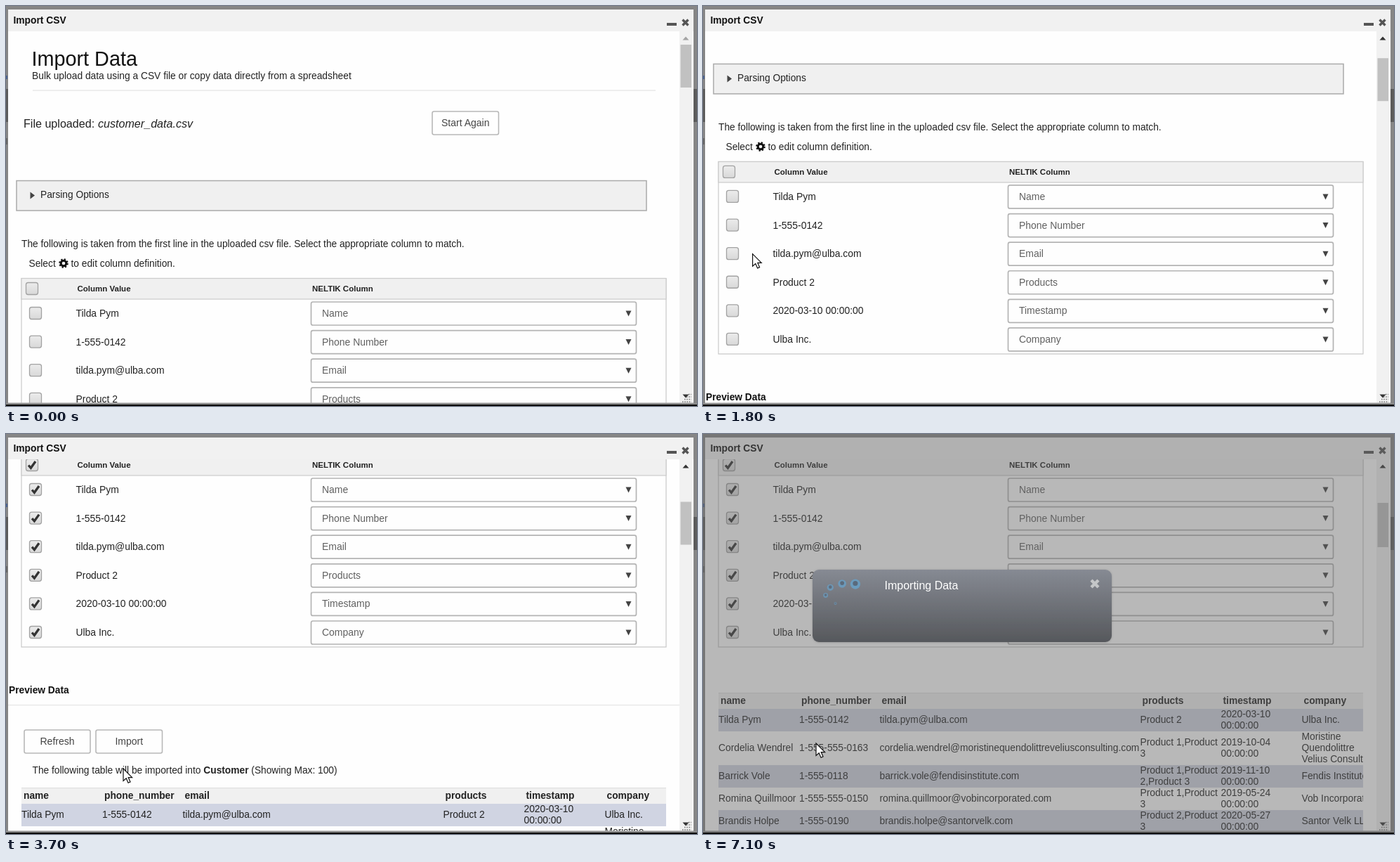
Recreate the animation shown at these times as an HTML page. Size 984 by 569 pixels, loop 7.2 s.

```html
<!DOCTYPE html>
<html lang="en">
<head>
<meta charset="utf-8">
<title>Import CSV</title>
<style>
html, body { margin: 0; width: 100%; height: 100%; overflow: hidden; background: #858585; }
svg { display: block; width: 984px; height: 569px; font-family: "Liberation Sans", Arial, sans-serif; }
text { white-space: pre; }
</style>
</head>
<body>
<svg id="stage" viewBox="0 0 984 569"></svg>
<script>
const LOOP = 7200, STEP = 100;
const CHECK_AT = 2500, IMPORT_AT = 4100;

// ---- markup helpers; text is placed by its vertical centre ----
const text = (x, y, str, { size = 13.8, fill = '#222', bold, italic, anchor = 'start' } = {}) =>
  `<text x="${x}" y="${y + size * 0.36}" font-size="${size}" fill="${fill}" text-anchor="${anchor}"` +
  `${bold ? ' font-weight="bold"' : ''}${italic ? ' font-style="italic"' : ''}>${str}</text>`;
const rect = (x, y, w, h, fill, extra = '') =>
  `<rect x="${x}" y="${y}" width="${w}" height="${h}" fill="${fill}" ${extra}/>`;
const path = (d, fill, extra = '') => `<path d="${d}" fill="${fill}" ${extra}/>`;

const button = (x, y, w, label) =>
  rect(x, y, w, 33, '#fefefe', 'rx="2.5" stroke="#b8b8b8" stroke-width="1.6"') +
  text(x + w / 2, y + 16, label, { size: 14, fill: '#444', anchor: 'middle' });

const checkbox = (x, y) =>
  rect(x - 8.5, y - 8.5, 17, 17, 'url(#box)', 'rx="3" stroke="#a2a2a2" stroke-width="1.3"') +
  `<g class="tick">${path(`M${x - 5} ${y + 0.5}l3.4 3.8L${x + 5} ${y - 5}`, 'none', 'stroke="#333" stroke-width="3.3"')}</g>`;

const select = (y, label) =>
  rect(434.5, y - 16, 463, 33, '#fefefe', 'rx="2.5" stroke="#b4b4b4" stroke-width="1.7"') +
  text(450, y, label, { size: 13.95, fill: '#606060' }) +
  path(`M882.5 ${y - 3.5}h8l-4 8z`, '#444');

const gear = (x, y) =>
  `<g fill="none" stroke="#111"><circle cx="${x}" cy="${y}" r="3.8" stroke-width="3"/>` +
  `<circle cx="${x}" cy="${y}" r="5.6" stroke-width="2.4" stroke-dasharray="2.2 2.2"/></g>`;

const cross = (x, y, r, color, width) =>
  path(`M${x - r} ${y - r}l${2 * r} ${2 * r}M${x + r} ${y - r}l${-2 * r} ${2 * r}`, 'none', `stroke="${color}" stroke-width="${width}"`);

// ---- data ----
const mapping = [
  ['Tilda Pym', 'Name'], ['1-555-0142', 'Phone Number'], ['tilda.pym@ulba.com', 'Email'],
  ['Product 2', 'Products'], ['2020-03-10 00:00:00', 'Timestamp'], ['Ulba Inc.', 'Company'],
];
const columns = [22, 137, 251.5, 622.5, 737.5, 852.5];
const headings = ['name', 'phone_number', 'email', 'products', 'timestamp', 'company'];
const records = [
  ['Tilda Pym', '1-555-0142', 'tilda.pym@ulba.com', 'Product 2', '2020-03-10|00:00:00', 'Ulba Inc.'],
  ['Cordelia Wendrel', '1-555-555-0163', 'cordelia.wendrel@moristinequendolittreveliusconsulting.com',
    'Product 1,Product|3', '2019-10-04|00:00:00', 'Moristine|Quendolittre|Velius Consulting'],
  ['Barrick Vole', '1-555-0118', 'barrick.vole@fendisinstitute.com',
    'Product 1,Product|2,Product 3', '2019-11-10|00:00:00', 'Fendis Institute'],
  ['Romina Quillmoor', '1-555-555-0150', 'romina.quillmoor@vobincorporated.com',
    'Product 1,Product|3', '2019-05-24|00:00:00', 'Vob Incorporated'],
  ['Brandis Holpe', '1-555-0190', 'brandis.holpe@santorvelk.com',
    'Product 2,Product|3', '2020-05-27|00:00:00', 'Santor Velk LLC'],
];

// ---- page parts, in document coordinates (scroll 0) ----
function topSection() {
  return text(36.5, 75, 'Import Data', { size: 28.8, fill: '#111' }) +
    text(37, 99, 'Bulk upload data using a CSV file or copy data directly from a spreadsheet') +
    rect(38, 119.5, 887, 1.2, '#e4e4e4') +
    text(25, 167, 'File uploaded: ', { size: 16.1 }) +
    text(131, 167, 'customer_data.csv', { size: 16.1, italic: true }) +
    button(607, 150, 94.5, 'Start Again') +
    rect(15, 248.5, 897, 42.5, '#f0f0f0', 'stroke="#aaa" stroke-width="1.5"') +
    path('M34.5 264.5v10l6.5-5z', '#444') +
    text(49, 268, 'Parsing Options', { size: 13.75 }) +
    text(22, 338, 'The following is taken from the first line in the uploaded csv file. Select the appropriate column to match.', { size: 13.72 }) +
    text(32.5, 366.5, 'Select', { size: 13.75 }) + gear(82, 366) +
    text(92.5, 366.5, 'to edit column definition.', { size: 13.75 });
}

function mappingTable() {
  const rows = mapping.map(([value, column], i) => {
    const y = 437 + i * 40.6;
    return checkbox(42, y) + text(99.5, y, value, { size: 13.9 }) + select(y, column);
  }).join('');
  return rect(22, 387.5, 918, 273.5, 'none', 'stroke="#c8c8c8" stroke-width="1.2"') +
    rect(22, 387.5, 918, 29.5, '#f0f0f0', 'stroke="#ccc" stroke-width="1.2"') +
    checkbox(37, 402) +
    text(101.5, 402, 'Column Value', { size: 11.5, bold: true }) +
    text(436, 402, 'NELTIK Column', { size: 11.5, bold: true }) + rows;
}

function previewIntro() {
  return text(4, 722.5, 'Preview Data', { size: 13.75, bold: true, fill: '#111' }) +
    rect(3, 743, 956, 1.2, '#e6e6e6') +
    button(26, 779, 94, 'Refresh') + button(128, 779, 94.5, 'Import') +
    text(37.5, 836.5, 'The following table will be imported into <tspan font-weight="bold">Customer</tspan> (Showing Max: 100)', { size: 13.75 });
}

function previewTable() {
  let out = rect(22, 861, 918, 23, '#f0f0f0') + rect(22, 861, 918, 1, '#ddd') +
    headings.map((h, i) => text(columns[i] + 3, 872.5, h, { bold: true })).join('');
  let y = 884;
  records.forEach((record, r) => {
    const h = r === 1 ? 48 : 32;
    if (r % 2 === 0) out += rect(22, y, 918, h, '#d0d4e2');
    record.forEach((cell, c) => {
      const lines = cell.split('|');
      lines.forEach((line, i) => {
        out += text(columns[c], y + h / 2 - 0.5 + (i - (lines.length - 1) / 2) * 16, line);
      });
    });
    y += h;
  });
  return out;
}

function windowFrame() {
  return rect(0, 0, 984, 569, '#868686') +
    rect(0, 118, 984, 47, '#5c5c5c') + rect(0, 99, 2, 5, '#4a6290') + rect(0, 188, 2, 9, '#666') +
    rect(3, 5, 976, 560, '#fefefe') + rect(3, 5, 976, 31, '#f1f1f1') +
    text(10.5, 20, 'Import CSV', { size: 13.8, bold: true, fill: '#111' }) +
    rect(941, 24, 14, 4, '#555') + cross(967.5, 23.5, 4, '#555', 3.4);
}

function scrollbar() {
  const dots = [0, 1, 2, 3].map(i => path(`M${972 - i * 3} ${552.5 + i * 3.5}H976`, 'none',
    'stroke="#777" stroke-width="1.6" stroke-dasharray="1.6 1.6"')).join('');
  return rect(959, 36, 19, 528, '#f1f1f1') +
    `<path id="up" d="M963.5 48.5l4.5-5 4.5 5z"/>` +
    path('M963.5 552.5h9l-4.5 5z', '#333') + dots +
    `<rect id="thumb" x="960.5" width="15.5" fill="#c1c1c1"/>`;
}

function dialog() {
  return rect(156, 193, 426, 103, 'url(#panel)', 'rx="9" filter="url(#shadow)"') +
    '<g id="spinner"></g>' +
    text(258.5, 215.5, 'Importing Data', { size: 16, fill: '#fff' }) +
    cross(558, 213, 5, '#c4c6c8', 4.4);
}

const stage = document.getElementById('stage');
stage.innerHTML = `
<defs>
  <linearGradient id="box" x2="0" y2="1"><stop stop-color="#ececec"/><stop offset="1" stop-color="#d8d8d8"/></linearGradient>
  <linearGradient id="panel" x2="0" y2="1"><stop stop-color="#868a93"/><stop offset="1" stop-color="#56585c"/></linearGradient>
  <filter id="shadow" x="-5%" y="-15%" width="110%" height="130%"><feDropShadow dx="0" dy="0.5" stdDeviation="1.5" flood-opacity=".2"/></filter>
  <clipPath id="view"><rect x="3" y="36" width="956" height="528.5"/></clipPath>
  <clipPath id="cells"><rect x="22" y="855" width="918" height="220"/></clipPath>
</defs>
${windowFrame()}
<g clip-path="url(#view)"><g id="page">
  ${topSection()}${mappingTable()}
  <g id="intro">${previewIntro()}</g>
  <g id="preview" clip-path="url(#cells)">${previewTable()}</g>
</g></g>
${scrollbar()}
${rect(0, 564.5, 984, 2.5, '#8c8c8c')}
<g id="busy">${rect(0, 0, 984, 569, '#626262', 'fill-opacity=".45"')}${dialog()}</g>
${rect(0, 567, 984, 2, '#0c0c0c')}
<path id="cursor" d="M0 0V17.5L4.2 13.8L7 20.2L10 18.9L7.2 12.6H12.6Z" fill="#fff" stroke="#111" stroke-width="1.2"/>`;

const $ = id => document.getElementById(id);
const ticks = [...document.querySelectorAll('.tick')];
const show = (el, on) => el.setAttribute('visibility', on ? 'visible' : 'hidden');

// ---- motion ----
const ease = (t, from, to) => {
  const u = Math.min(1, Math.max(0, (t - from) / (to - from)));
  return u * u * (3 - 2 * u);
};
const scrollAt = t => 192 * ease(t, 1400, 1920) + 166 * ease(t, 2800, 3420);

// each move: start, end, x, y
const moves = [[300, 1300, 77, 383], [1650, 2200, 42, 217], [3000, 3600, 167, 476], [3700, 3950, 161, 440]];
function cursorAt(t) {
  let x = 240, y = 575;
  for (const [from, to, mx, my] of moves) {
    const k = ease(t, from, to);
    x += (mx - x) * k;
    y += (my - y) * k;
  }
  return [x, y];
}

// five shrinking bubbles chase each other round a tilted ring
function spinner(t) {
  const head = -Math.PI / 3 + 2 * Math.PI * (t - 6000) / 1108;
  return [1, 0.82, 0.61, 0.4, 0.2].map((scale, i) => {
    const turn = head - i * Math.PI / 4;
    const a = turn - 0.22 * Math.cos(turn);
    const r = (8.5 + 1.5 * Math.sin(a)) * scale;
    const x = 205.5 + 31 * Math.cos(a), y = 228 + 15.5 * Math.sin(a);
    return `<g opacity="${0.6 + 0.4 * scale}"><circle cx="${x}" cy="${y}" r="${r}" fill="#6b9cbe"/>` +
      `<circle cx="${x}" cy="${y - r * 0.15}" r="${r * 0.5}" fill="#5a6a7c"/></g>`;
  }).join('');
}

function draw(t) {
  const scroll = scrollAt(t), busy = t >= IMPORT_AT;
  $('page').setAttribute('transform', `translate(0 ${-scroll})`);
  $('preview').setAttribute('transform', `translate(0 ${busy ? -135 : 0})`);
  $('thumb').setAttribute('y', 55 + scroll * (busy ? 0.12 : 0.1159));
  $('thumb').setAttribute('height', busy ? 63 : 61);
  $('up').setAttribute('fill', scroll > 0 ? '#333' : '#a3a3a3');
  ticks.forEach(tick => show(tick, t >= CHECK_AT));
  show($('intro'), !busy);
  show($('busy'), busy);
  if (busy) $('spinner').innerHTML = spinner(t);
  $('cursor').setAttribute('transform', `translate(${cursorAt(t)})`);
}

const start = performance.now();
function tick() {
  const t = (performance.now() - start) % LOOP;
  draw(Math.floor(t / STEP) * STEP);
  requestAnimationFrame(tick);
}
tick();
</script>
</body>
</html>
```
